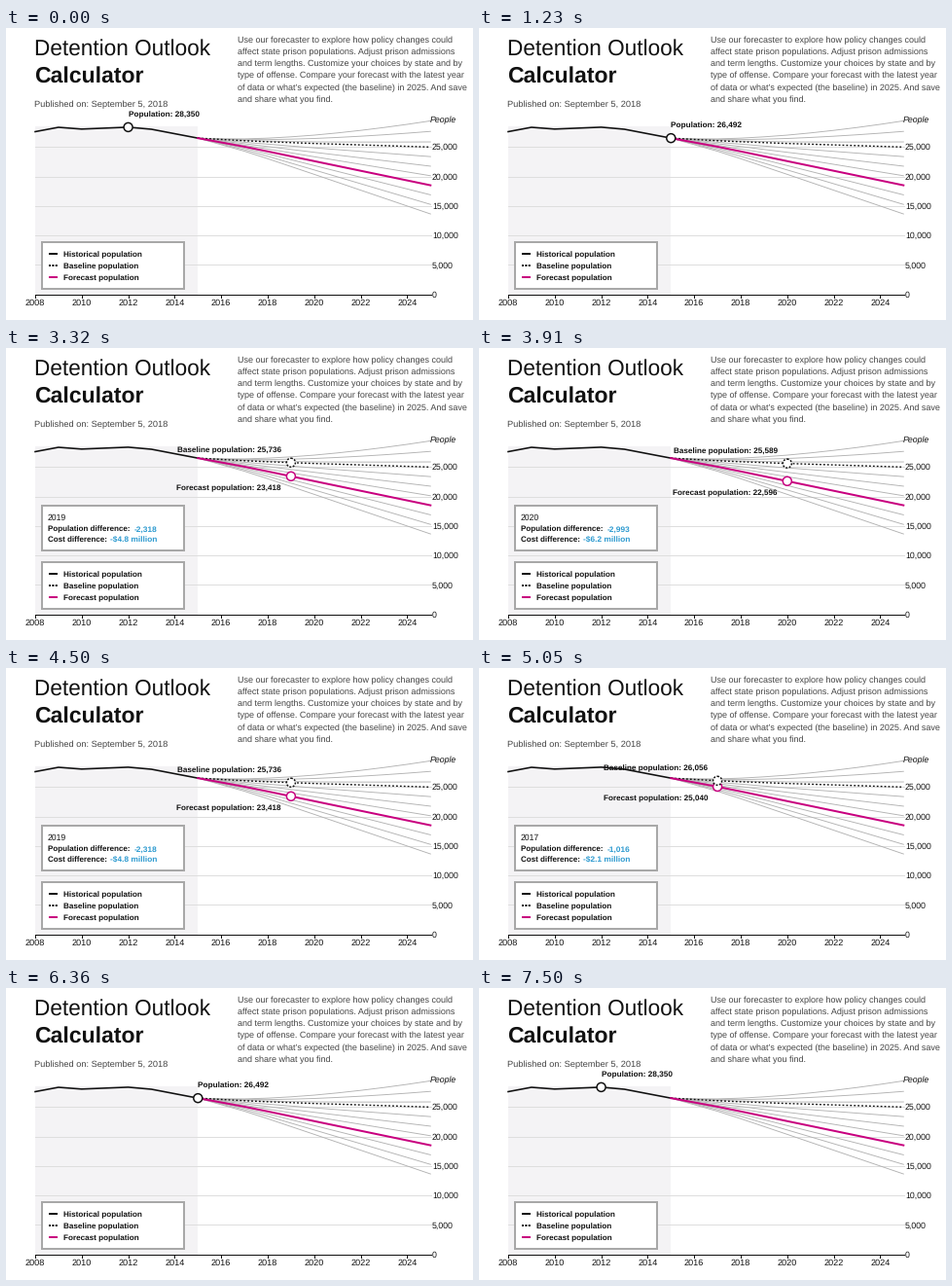
Write a matplotlib script that moves like this. It is 480 px wide and 300 px high and loops after 7550 ms.

```python
import matplotlib.pyplot as plt
import numpy as np
from matplotlib.animation import FuncAnimation
from matplotlib.patches import Rectangle

W, H, DPI = 480, 300, 100
STEP, LOOP = 50, 7550
PT = 72 / DPI  # points per pixel

INK, TEXT = "#111111", "#444444"
PINK, BLUE = "#c8007f", "#2f9bd0"
FAN, GRID, FRAME, SHADE = "#b2b2b2", "#dedede", "#a8a8a8", "#f4f3f5"

plt.rcParams["font.family"] = "Liberation Sans"
plt.rcParams["text.hinting"] = "none"

SPLIT = 2015  # last year with real data
COST_RATE = 0.00207  # million dollars per person


def curve(**points):
    """Straight pieces through points given as y<year>=value."""
    years = [int(k[1:]) for k in points]
    values = list(points.values())
    return lambda year: np.interp(year, years, values)


history = curve(y2008=27590, y2009=28330, y2010=28030, y2012=28350,
                y2013=28000, y2015=26492)
baseline = curve(y2015=26492, y2017=26056, y2018=25884, y2020=25589,
                 y2025=24980)
forecast = curve(y2015=26492, y2017=25040, y2018=24240, y2020=22596,
                 y2025=18500)


def px(year):
    return 30 + (year - 2008) * 23.9


def py(value):
    return 273.7 - value * 30.3 / 5000


def pointed_year(ms):
    """Year nearest the pointer, which sweeps to 2020 and back."""
    times = [0, 140, 1050, 1770, 3500, 3850, 4200, 4910, 5850, 6450, 7230]
    spots = [12.4, 12.5, 14.5, 16.5, 19.5, 20, 19.5, 17.5, 15.5, 14.5, 12.4]
    return 2000 + int(np.interp(ms, times, spots) + 0.5)


fig = plt.figure(figsize=(W / DPI, H / DPI), dpi=DPI, facecolor="white")
ax = fig.add_axes([0, 0, 1, 1])
ax.set_xlim(0, W)
ax.set_ylim(H, 0)
ax.axis("off")


def put(x, y, s, size, color=INK, **kw):
    return ax.text(x, y, s, fontsize=size * PT, color=color, va="baseline",
                   zorder=8, **kw)


def bold(x, y, s="", size=8.15, color=INK, **kw):
    return put(x, y, s, size, color, weight="bold", **kw)


def line(x, y, color, width, z=3, **kw):
    ax.plot(x, y, color=color, lw=width * PT, zorder=z, **kw)


def box(x0, y0, x1, y1):
    return ax.add_patch(Rectangle((x0, y0), x1 - x0, y1 - y0, fc="white",
                                  ec=FRAME, lw=2 * PT, zorder=6))


def ring(color, **kw):
    return ax.add_patch(plt.Circle((0, 0), 4.5, fc="white", ec=color,
                                   lw=1.5 * PT, zorder=7, **kw))


def draw_header():
    put(29, 28, "Detention Outlook", 22.6)
    bold(29, 56, "Calculator", 23)
    put(29, 81, "Published on: September 5, 2018", 9.3, TEXT)
    intro = ["Use our forecaster to explore how policy changes could",
             "affect state prison populations. Adjust prison admissions",
             "and term lengths. Customize your choices by state and by",
             "type of offense. Compare your forecast with the latest year",
             "of data or what’s expected (the baseline) in 2025. And save",
             "and share what you find."]
    for i, s in enumerate(intro):
        put(238, 15.3 + 12.1 * i, s, 9.05, TEXT)


def draw_axes():
    ax.add_patch(Rectangle((30, 101), px(SPLIT) - 30, py(0) - 101, fc=SHADE,
                           ec="none", zorder=0))
    for v in range(0, 30000, 5000):
        if v:
            line([30, 437], [py(v)] * 2, GRID, 1, 1)
        put(438, py(v) + 3, f"{v:,}", 8.8)
    put(436, 97, "People", 8.8, style="italic")
    line([30, 437], [py(0)] * 2, INK, 1, 2)
    for year in range(2008, 2026, 2):
        line([px(year)] * 2, [py(0), py(0) + 3], INK, 1, 2)
        put(px(year), 285, str(year), 9.1, ha="center")


def draw_series():
    past, ahead = np.arange(2008, SPLIT + 1), np.arange(SPLIT, 2026)
    base, fore = py(baseline(ahead)), py(forecast(ahead))
    # Cuts are multiples of a quarter of the forecast's own drop
    for k in range(1, 8):
        if k != 4:
            line(px(ahead), base + (fore - base) * k / 4, FAN, 0.9)
    # Rises start slowly and bend upward
    for k in range(3):
        rise = (5.3 + 10.8 * k) * ((ahead - SPLIT) / 10) ** 1.65
        line(px(ahead), base - rise, FAN, 0.9)
    line(px(past), py(history(past)), INK, 1.6, 4)
    line(px(ahead), base, INK, 1.4, 4, ls=(0, (1.3, 1.5)))
    line(px(ahead), fore, PINK, 2, 5)


def draw_legend():
    box(37, 220, 183, 268)
    rows = [("Historical", INK, "-"), ("Baseline", INK, (0, (1, 0.7))),
            ("Forecast", PINK, "-")]
    for i, (name, color, dash) in enumerate(rows):
        y = 232 + 12.2 * i
        line([44, 53], [y - 0.4] * 2, color, 2, 7, ls=dash,
             solid_capstyle="butt")
        bold(59, y + 3, name + " population")


draw_header()
draw_axes()
draw_series()
draw_legend()

# Moving parts
past_ring, fore_ring = ring(INK), ring(PINK)
base_ring = ring(INK, ls=(0, (1.3, 1)))
past_label = bold(0, 0, size=8.25)
base_label, fore_label = bold(0, 0, ha="right"), bold(0, 0, ha="right")
year_text = put(43, 176.5, "", 8.6)
diff_text = bold(131.5, 188.5, size=8.4, color=BLUE)
cost_text = bold(107, 199.3, size=8.4, color=BLUE)
past_parts = [past_ring, past_label]
future_parts = [
    base_ring, fore_ring, base_label, fore_label,
    year_text, diff_text, cost_text, box(37, 162, 183, 208),
    bold(43, 188.5, "Population difference:", 8.05),
    bold(43, 199.3, "Cost difference:", 8.05)]


def mark(circle, label, name, year, value, dx, dy):
    x, y = px(year), py(value)
    circle.center = x, y
    label.set_position((x + dx, y + dy))
    label.set_text(f"{name}: {value:,.0f}")


def show_past(year):
    mark(past_ring, past_label, "Population", year, history(year), 0, -10.5)


def show_future(year):
    base, fore = baseline(year), forecast(year)
    mark(base_ring, base_label, "Baseline population", year, base, -10, -10.7)
    mark(fore_ring, fore_label, "Forecast population", year, fore, -10, 14.5)
    year_text.set_text(str(year))
    diff_text.set_text(f"-{base - fore:,.0f}")
    cost_text.set_text(f"-${(base - fore) * COST_RATE:.1f} million")


def update(i):
    year = pointed_year(i * STEP)
    future = year > SPLIT
    for part in past_parts:
        part.set_visible(not future)
    for part in future_parts:
        part.set_visible(future)
    (show_future if future else show_past)(year)
    return past_parts + future_parts


anim = FuncAnimation(fig, update, frames=LOOP // STEP, interval=STEP,
                     init_func=lambda: update(0), repeat=True,
                     repeat_delay=0, blit=False)
plt.show()
```
